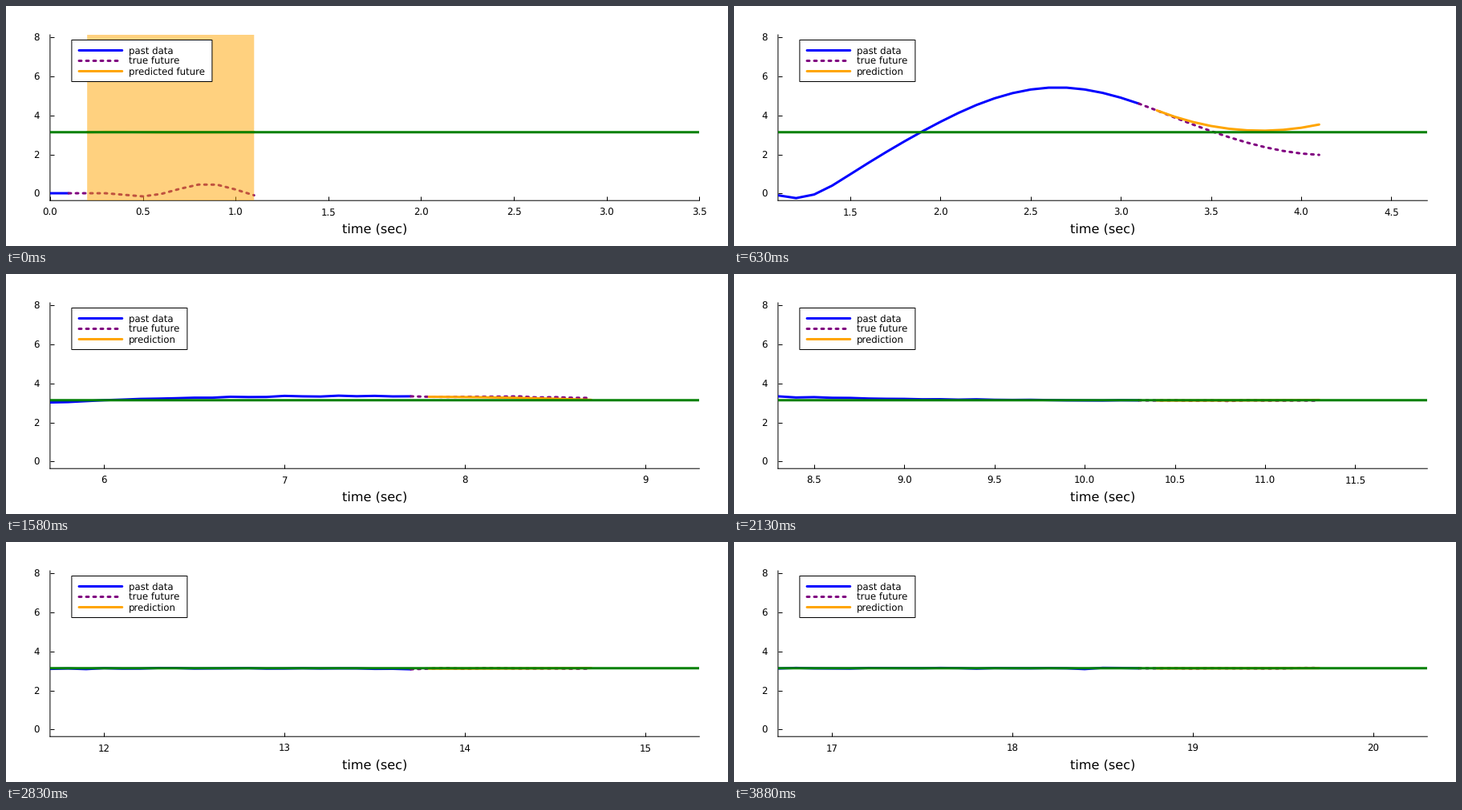
These frames come from a looping animation (900x300 px, 3.93 s). A matplotlib script:

```python
import numpy as np
import matplotlib.pyplot as plt
from matplotlib.animation import FuncAnimation
from matplotlib.lines import Line2D
from matplotlib.patches import Rectangle
from matplotlib.transforms import IdentityTransform

W, H, DPI = 900, 300, 100
PT = 72 / DPI                      # points per pixel
TICKS, STEPS = 393, 94             # 10 ms ticks, 24 steps per second
BAND_STEPS = 5                     # steps before the model predicts
LEFT, RIGHT, TOP, BOTTOM = 54.9, 864.3, 36, 243.2
Y_ZERO, Y_UNIT = 234.3, 24.36
SMALL, LARGE = 11.75 * PT, 16.15 * PT

plt.rcParams.update({"font.family": "DejaVu Sans", "text.hinting": "none",
                     "font.size": SMALL, "path.snap": False})

# Key poses of the swing-up: time, angle, speed
POSES = [(0, .01, 0), (.3, .01, 0), (.5, -.15, 0), (.85, .49, 0),
         (1.2, -.24, 0), (1.5, .98, 5.9), (2.1, 4.13, 4.4), (2.65, 5.44, 0),
         (3.2, 4.26, -3.7), (4.15, 1.97, 0), (4.9, 2.5, .8), (6, 3.13, .35),
         (7.4, 3.35, 0), (9, 3.22, -.15), (10.7, 3.12, 0), (21, np.pi, 0)]


def hermite(t, poses):
    """Cubic curve through poses given as (time, value, speed)."""
    kt, kx, kv = np.array(poses).T
    i = np.clip(np.searchsorted(kt, t, "right") - 1, 0, len(kt) - 2)
    h = kt[i + 1] - kt[i]
    u = (t - kt[i]) / h
    ease = u * u * (3 - 2 * u)
    return (kx[i] + (kx[i + 1] - kx[i]) * ease
            + h * u * (1 - u) * (kv[i] * (1 - u) - kv[i + 1] * u))


T = np.arange(205) / 10
CURVE = hermite(T, POSES)
SPEED = np.gradient(CURVE, T)
X = CURVE + np.random.default_rng(4).normal(0, .014, T.size) * (T > 5)


def predict(step, k):
    """Ten-point forecast starting at sample k."""
    tau = np.arange(10) / 10
    if step < BAND_STEPS:
        return np.pi + .03 * np.sin(9 * tau) * np.exp(-3 * tau)
    err = X[k] - np.pi
    miss = .05 * np.exp(-step / 40) + min(3.8, .36 * np.exp(1.15 * (15 - step)))
    bend = (miss - err - .9 * SPEED[k]) / .81
    return np.pi + err + SPEED[k] * tau + bend * tau ** 2


fig = plt.figure(figsize=(W / DPI, H / DPI), dpi=DPI, facecolor="white")
ax = fig.add_axes([LEFT / W, 1 - BOTTOM / H, (RIGHT - LEFT) / W, (BOTTOM - TOP) / H])
ax.set_ylim((Y_ZERO - BOTTOM) / Y_UNIT, (Y_ZERO - TOP) / Y_UNIT)
ax.set_yticks(range(0, 9, 2))
ax.set_axisbelow(True)
ax.tick_params(direction="in", length=5 * PT, width=PT, labelsize=SMALL)
ax.tick_params(axis="x", pad=9.4 * PT)
ax.tick_params(axis="y", pad=13 * PT)
for side, spine in ax.spines.items():
    spine.set(visible=side in ("left", "bottom"), linewidth=PT, zorder=.6)

PAST = dict(color="#0000ff", lw=3 * PT, solid_capstyle="round")
TRUE = dict(color="#800080", lw=3 * PT, ls=(0, (1, 2)), dash_capstyle="round")
PRED = dict(color="#ffa500", lw=3 * PT, solid_capstyle="round")

past, = ax.plot([], [], zorder=2, **PAST)
future, = ax.plot([], [], zorder=2.1, **TRUE)
band = ax.add_patch(Rectangle((0, -1), .9, 10, fc="#ffa500", alpha=.5, lw=0, zorder=2.2))
forecast, = ax.plot([], [], zorder=2.3, **PRED)
ax.axhline(np.pi, color="#008000", lw=3 * PT, zorder=2.4)


def put(artist, z):
    """Place an artist in pixels, above the axes."""
    artist.set_transform(IdentityTransform())
    artist.set_zorder(z)
    return fig.add_artist(artist)


def label(x, y, text, size=SMALL, ha="left"):
    return fig.text(x, H - y, text, fontsize=size, ha=ha, va="baseline",
                    transform=IdentityTransform(), zorder=12)


box = put(Rectangle((81.9, H - 94.5), 144, 52, fc="white", ec="black", lw=PT), 10)
names = []
for row, (style, text) in enumerate(
        [(PAST, "past data"), (TRUE, "true future"), (PRED, "prediction")]):
    y = 55.5 + 13 * row
    put(Line2D([91, 144.8], [H - y, H - y], **style), 11)
    names.append(label(153, y + 3.5, text))
label(459.8, 284, "time (sec)", LARGE, "center")


def show_step(step):
    now = 2 * step + 1             # newest sample
    first, last = max(0, now - 20), max(35, now + 16)
    ax.set_xlim(first / 10, last / 10)

    gap = 10 if first % 10 >= 5 else 5
    ticks = np.arange(-(-first // gap) * gap, last + 1, gap) / 10
    ax.set_xticks(ticks, [f"{v:.0f}" if gap == 10 else f"{v:.1f}" for v in ticks])

    past.set_data(T[first:now + 1], X[first:now + 1])
    future.set_data(T[now:now + 11], X[now:now + 11])
    forecast.set_data(T[now + 1:now + 11], predict(step, now + 1))

    early = step < BAND_STEPS
    band.set_visible(early)
    band.set_x(T[now + 1])
    box.set_width(175 if early else 144)
    names[2].set_text("predicted future" if early else "prediction")


shown = None


def update(tick):
    global shown
    step = min(STEPS - 1, ((2 * tick + 1) * 12 - 1) // 100)
    if step != shown:
        show_step(step)
        shown = step
    return []


anim = FuncAnimation(fig, update, frames=TICKS, interval=10, repeat=True,
                     repeat_delay=0, init_func=lambda: update(0), blit=False)
plt.show()
```
